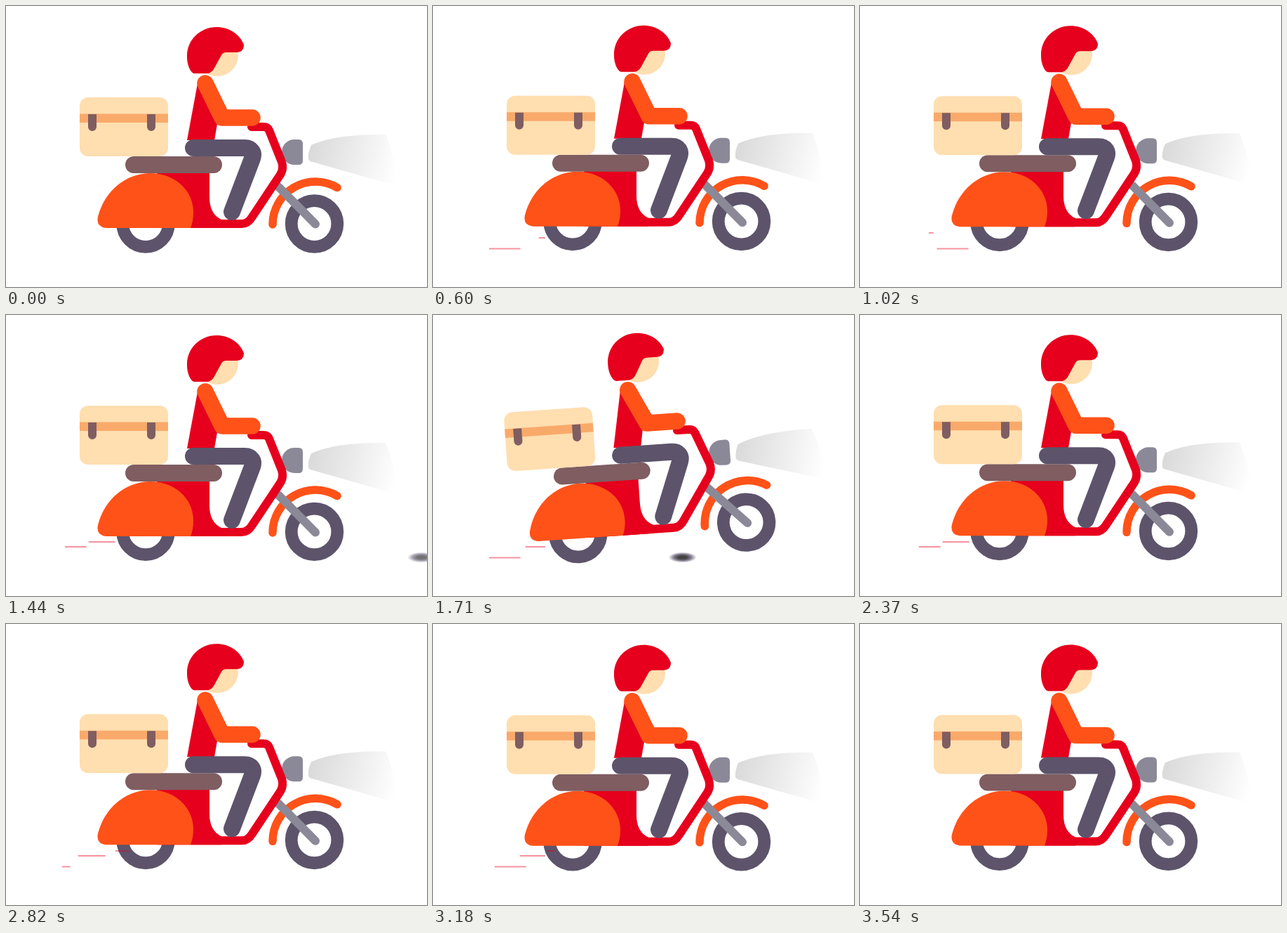
Recreate the animation shown at these times as an HTML page. Size 600 by 400 pixels, loop 3570 ms.

```html
<!DOCTYPE html>
<html lang="en">
<head>
<meta charset="utf-8">
<title>Delivery scooter</title>
<style>
  html, body { margin: 0; width: 100%; height: 100%; overflow: hidden; background: #fff; }
  svg { display: block; width: 600px; height: 400px; }
  .pipe { fill: none; stroke-linecap: round; stroke-linejoin: round; }
</style>
</head>
<body>
<svg viewBox="0 0 600 400">
  <defs>
    <linearGradient id="beamFill" x1="0" y1="0.4" x2="1" y2="0.55">
      <stop offset="0" stop-color="#dadada"/>
      <stop offset="0.5" stop-color="#ececec"/>
      <stop offset="1" stop-color="#fff"/>
    </linearGradient>
    <radialGradient id="stoneFill">
      <stop offset="0.3" stop-color="#444"/>
      <stop offset="0.6" stop-color="#5d546b" stop-opacity="0.8"/>
      <stop offset="1" stop-color="#5d546b" stop-opacity="0"/>
    </radialGradient>
  </defs>

  <g id="scooter">
    <g id="wheels" fill="#fff" stroke="#5d546b" stroke-width="17.8">
      <circle cx="199" cy="310" r="32.8"/>
      <circle cx="439.5" cy="310" r="32.8"/>
    </g>
    <g id="body">
      <path fill="url(#beamFill)" d="M435 198Q430 209 431 218Q432 221 437 222L560 257Q553 212 541 183Q470 182 435 198Z"/>
      <path fill="#8b8997" d="M411 190H417Q423 190 423 196V220Q423 226 417 226H411A18 18 0 0 1 411 190Z"/>
      <path class="pipe" stroke="#ff5219" stroke-width="11.5" d="M380 311A61 61 0 0 1 472 258.500"/>
      <path class="pipe" stroke="#8b8997" stroke-width="12" d="M388 257L441 310.500"/>
      <path fill="#e6001d" d="M215 237H290V272Q290 296 307 304V316H215Z"/>
      <path class="pipe" stroke="#e6001d" stroke-width="12" d="M350 172H367Q373 172 375 177L393 222Q396 232 391 240L351 300Q345 310 336 310H264"/>
      <path fill="#ff5219" d="M142 316Q128 314 131 300C140 264 170 238 206 238C240 238 267 262 267 294Q267 306 263 316Z"/>
      <rect x="170" y="214" width="138" height="24" rx="12" fill="#7f5d61"/>

      <path fill="#e6001d" d="M274 105L258 191H297L301 168L286 108Z"/>
      <path class="pipe" stroke="#5d546b" stroke-width="24" d="M267 202H340C350 202 354 209 351 217L322 293"/>
      <path class="pipe" stroke="#ff5219" stroke-width="23.500" d="M284 110L308 159H351"/>
      <circle cx="301" cy="70" r="30" fill="#ffdeb0"/>
      <path fill="#e6001d" d="M268 96Q264 95 261 88C258 80 258 75 258 71C258 48 277 30 300 30C318 30 333 40 339 55Q339 66 328 66H314Q309 66 307 70L296 90Q292 96 286 96Z"/>

      <g id="parcel">
        <rect x="105" y="130" width="126" height="84" rx="12" fill="#ffdeb0"/>
        <path fill="#f9aa6a" d="M105 153.500H231V166H105Z"/>
        <path fill="#7f5d61" d="M117 154H129V172A6 6 0 0 1 117 172ZM201 154H213V172A6 6 0 0 1 201 172Z"/>
      </g>
    </g>
  </g>

  <g id="streaks" stroke="#e6001d" stroke-width="2" opacity="0.42"></g>
  <ellipse id="stone" cy="345" rx="20" ry="7.500" fill="url(#stoneFill)"/>
</svg>
<script>
  const LOOP = 3570, BOB = 450, STREAK_SPEED = 0.3;
  const $ = id => document.getElementById(id);
  const set = (el, attrs) => Object.entries(attrs).forEach(([k, v]) => el.setAttribute(k, v));

  // Smooth bump: 0 at both ends, 1 halfway
  const hump = (t, from, to) =>
    t > from && t < to ? Math.sin(Math.PI * (t - from) / (to - from)) ** 2 : 0;

  const streaks = [
    { y: 323, left: 98, right: 175, size: 38, starts: [210, 660, 1250, 1707, 2180, 2757, 3140] },
    { y: 330, left: 84, right: 160, size: 39, starts: [120, 570, 1160, 1617, 2090, 2630, 3060] },
    { y: 345.500, left: 80, right: 157, size: 45, starts: [343, 863, 1453, 1910, 2453, 2950] }
  ];
  for (const s of streaks) {
    s.line = document.createElementNS("http://www.w3.org/2000/svg", "line");
    set(s.line, { y1: s.y, y2: s.y });
    $("streaks").append(s.line);
  }

  function drawStreak({ line, left, right, size, starts }, t) {
    const start = starts.filter(s => s <= t).pop() ?? -LOOP;
    const moved = (t - start) * STREAK_SPEED;
    const x1 = Math.max(left, right - moved);
    const x2 = Math.min(right, right - moved + size);
    set(line, { x1, x2, visibility: x2 > x1 ? "visible" : "hidden" });
  }

  function draw(t) {
    const bob = Math.sin(Math.PI * t / BOB) ** 2;
    set($("body"), { transform: `translate(0 ${-3 * bob})` });
    set($("wheels"), { transform: `translate(0 ${-4.6 * bob})` });

    // The front wheel climbs the stone first, then the rear one
    const tilt = 2.5 * hump(t, 1770, 1975) - 4 * hump(t, 1605, 1800);
    const lift = 9 * hump(t, 1640, 1970);
    set($("scooter"), { transform: `translate(0 ${-lift}) rotate(${tilt} 300 200)` });

    const toss = hump(t, 1850, 2130);
    set($("parcel"), { transform: `translate(0 ${-13 * toss}) rotate(${3.6 * toss} 168 172)` });

    set($("stone"), {
      cx: 593 - (t - 1440) * 0.876,
      opacity: t < 1400 || t > 2045 ? 0 : Math.min(1, 0.75 + (t - 1440) / 300)
    });
    streaks.forEach(s => drawStreak(s, t));
  }

  const begin = performance.now();
  function tick() {
    draw((performance.now() - begin) % LOOP);
    requestAnimationFrame(tick);
  }
  tick();
</script>
</body>
</html>
```
